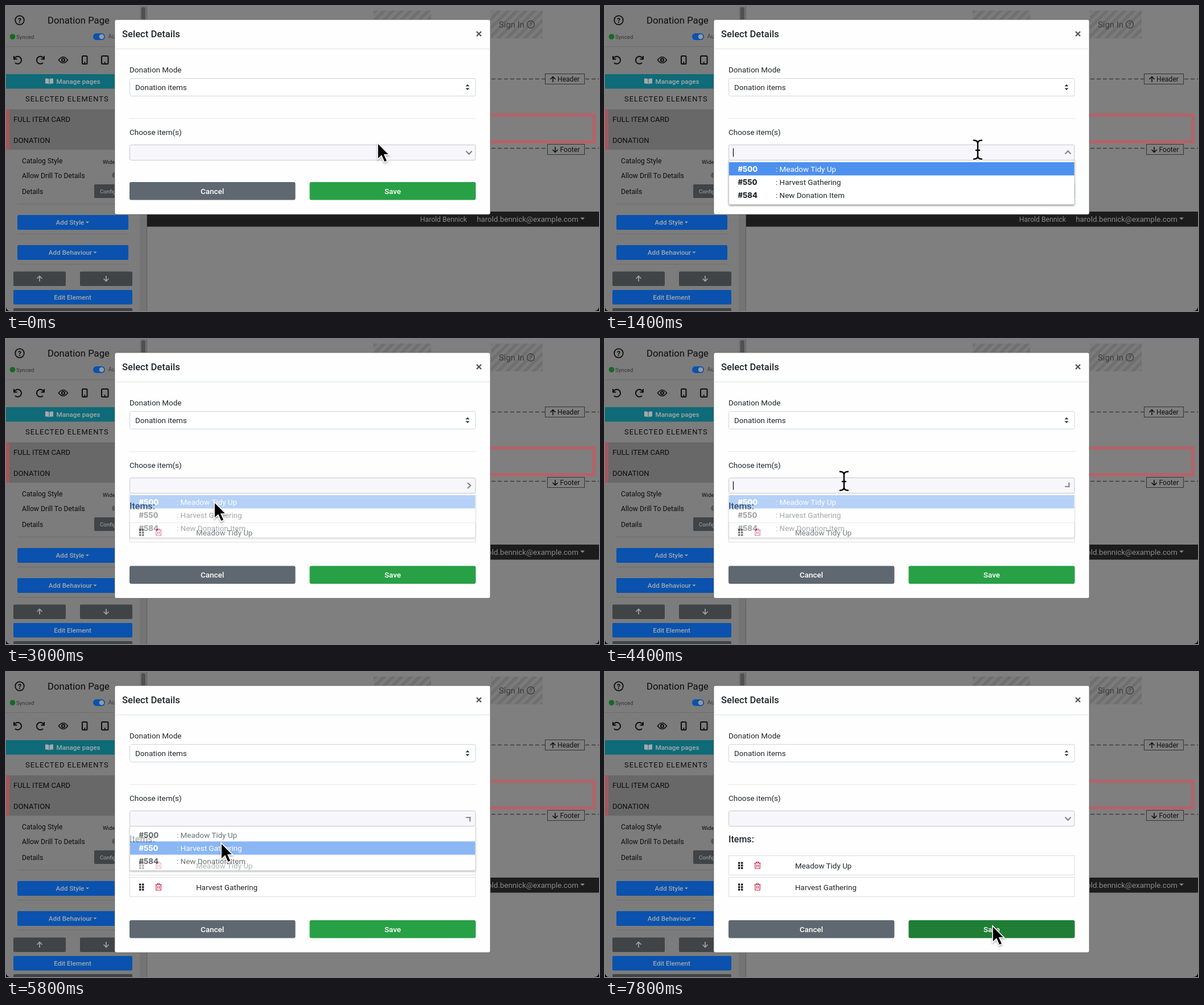
Animation of 1042 by 537 pixels, one loop 8000 ms. Source, as an HTML page:

```html
<!DOCTYPE html>
<html lang="en">
<head>
<meta charset="utf-8">
<title>Select Details</title>
<style>
  html, body { margin: 0; width: 100%; height: 100%; overflow: hidden; background: #000; }
  svg { display: block; width: 1042px; height: 537px; }
  text { font-family: Roboto, sans-serif; font-size: 13.45px; fill: #212529; white-space: pre; }
  .side text { font-size: 12.2px; fill: #0c0d0e; }
  .side .section { font-size: 13.1px; }
  .side .tiny { font-size: 9.7px; }
  .side .light { font-size: 11.7px; font-weight: 500; fill: #a5a9ad; text-anchor: middle; }
  .page text { font-size: 12.1px; fill: #111; }
  .page .user { font-size: 12.2px; fill: #8b8b8b; text-anchor: end; }
  .icon { fill: none; stroke: #0c0d0e; stroke-width: 2; }
  .pale { fill: none; stroke: #a0a4a8; stroke-width: 1.7; }
  .rule { stroke: #6b6c6d; }
  .blue { fill: #0a52ad; }
  .dark { fill: #404447; }
  .dash { stroke: #3c3c3c; stroke-width: 1.3; stroke-dasharray: 7 4; }
  .tag { fill: #7f7f7f; stroke: #333; }
  .title { font-size: 16.6px; font-weight: 500; }
  .button { font-weight: 500; fill: #fff; text-anchor: middle; }
  .code { font-family: Inter, sans-serif; font-size: 13px; font-weight: 800; }
  .on text { fill: #fff; }
  .field { fill: #fff; stroke: #ced4da; }
</style>
</head>
<body>
<svg viewBox="0 0 1042 537">
  <defs>
    <clipPath id="window"><path d="M0 0H1042V528Q1042 537 1033 537H9Q0 537 0 528Z"/></clipPath>
    <pattern id="hatch" width="11" height="11" patternUnits="userSpaceOnUse" patternTransform="rotate(45)">
      <rect width="11" height="11" fill="#7b7b7b"/><rect width="5.5" height="11" fill="#6f6f6f"/>
    </pattern>
    <filter id="shadow" x="-40%" y="-40%" width="200%" height="200%">
      <feDropShadow dx="0" dy="2" stdDeviation="1.8" flood-opacity=".35"/>
    </filter>
    <g id="handle">
      <g fill="#222">
        <rect x="234" width="3.4" height="3.4" y="-6"/><rect x="239" width="3.4" height="3.4" y="-6"/>
        <rect x="234" width="3.4" height="3.4" y="-1.5"/><rect x="239" width="3.4" height="3.4" y="-1.5"/>
        <rect x="234" width="3.4" height="3.4" y="3"/><rect x="239" width="3.4" height="3.4" y="3"/>
      </g>
      <path d="M262.5-4H273.5M266-4V-6H270V-4M263.8-4V5.5H272.2V-4M266.6-1.500V3M269.4-1.500V3" fill="none" stroke="#c51f3f" stroke-width="1.2"/>
    </g>
    <path id="up" d="M0 5V-4.500M-4.500 0L0-4.500L4.500 0"/>
    <path id="caretDown" d="M-3-1.500H3L0 1.500Z"/>
  </defs>

  <g clip-path="url(#window)">
    <rect width="1042" height="537" fill="#7f7f7f"/>

    <g class="page">
      <rect x="646" y="8" width="101" height="40" fill="url(#hatch)"/>
      <rect x="852" y="8" width="91" height="49" fill="url(#hatch)"/>
      <text x="866" y="38" style="font-size:14.9px;fill:#3d3d3d">Sign In</text>
      <circle cx="922" cy="32.500" r="6.500" fill="none" stroke="#3d3d3d" stroke-width="1.4"/>
      <text x="922" y="36.500" text-anchor="middle" style="font-size:11px;fill:#3d3d3d">?</text>
      <path class="dash" d="M248 128.500H1042M248 250.500H1042"/>
      <rect x="254" y="192" width="779" height="47" fill="#7f7f7f" stroke="#b0646a" stroke-width="6"/>
      <rect class="tag" x="947.500" y="119.500" width="69" height="18"/>
      <use href="#up" x="961" y="129" class="icon" style="stroke-width:1.5"/>
      <text x="969" y="133">Header</text>
      <rect class="tag" x="951.500" y="243.500" width="65" height="18"/>
      <use href="#up" transform="translate(965 253) scale(1 -1)" class="icon" style="stroke-width:1.5"/>
      <text x="973.500" y="257">Footer</text>
      <rect x="248" y="362" width="794" height="26.500" fill="#1c1c1c"/>
      <text class="user" x="810" y="380">Harold Bennick</text>
      <text class="user" x="1006" y="380" style="font-size:13.3px">harold.bennick@example.com</text>
      <use href="#caretDown" transform="translate(1013 374.500) scale(1.3)" fill="#8b8b8b"/>
    </g>

    <g class="side">
      <rect width="236" height="537" fill="#7c7c7d"/>
      <rect x="235" width="13" height="537" fill="#747475"/>
      <rect x="237.500" y="2" width="7.500" height="300" rx="3.700" fill="#505050"/>
      <path d="M247.500 0V537" stroke="#5e5e5e"/>
      <path class="rule" d="M0 71.500H235"/>
      <circle class="icon" cx="24" cy="25" r="7.800" style="stroke-width:1.8"/>
      <text x="24" y="29.500" text-anchor="middle" font-weight="700">?</text>
      <text x="73" y="31" style="font-size:16.7px">Donation Page</text>
      <circle cx="11.500" cy="54" r="4.800" fill="#136b20"/>
      <text class="tiny" x="18" y="57.500" style="fill:#333">Synced</text>
      <rect class="blue" x="153" y="48" width="21" height="12" rx="6"/>
      <circle cx="168" cy="54" r="4.300" fill="#96999d"/>
      <text x="179.500" y="57" style="font-size:10.5px;fill:#3c3c3c">Auto</text>

      <g class="icon">
        <path id="undo" d="M14 88V93.500H19.500M14.500 93A6.500 6.500 0 1 1 16 100"/>
        <use href="#undo" transform="translate(81 0) scale(-1 1)"/>
        <path d="M92.500 95Q100.500 84.500 108.500 95Q100.500 105.500 92.500 95Z" style="stroke-width:1.6"/>
        <circle cx="100.500" cy="95" r="2.600"/>
        <rect x="134" y="88" width="8.500" height="14" rx="1.500"/>
        <rect x="168" y="88" width="11.500" height="14" rx="1.500"/>
        <path d="M137 99.500H139.500M172.500 99.500H175"/>
      </g>

      <rect y="120" width="235" height="25.500" fill="#0f6b78"/>
      <path d="M69 127.500Q73 127 75.500 128.500V137.500Q73 136 69 136.500ZM83 127.500Q79 127 76.500 128.500V137.500Q79 136 83 136.500Z" fill="#a5a9ad"/>
      <text class="light" x="127" y="136.500">Manage pages</text>
      <text x="34" y="167.500" style="font-size:13px;letter-spacing:1px">SELECTED ELEMENTS</text>
      <rect y="182" width="235" height="71" fill="#686869"/>
      <rect y="182" width="6" height="71" fill="#a3575d"/>
      <text class="section" x="13" y="204">FULL ITEM CARD</text>
      <text class="section" x="13" y="240.500">DONATION</text>
      <text x="28" y="277">Catalog Style</text>
      <text class="tiny" x="170" y="277.500">Wide</text>
      <text x="28" y="302.500">Allow Drill To Details</text>
      <circle cx="191" cy="298" r="5" fill="#555"/>
      <text x="28" y="330.500">Details</text>
      <rect class="dark" x="155" y="314" width="60" height="24" rx="2"/>
      <text class="tiny" x="165" y="329.500" style="fill:#a5a9ad">Configure</text>
      <path class="rule" d="M20 348.500H215M20 401.500H215M20 454.500H215"/>
      <rect class="blue" x="20" y="368" width="195" height="26" rx="2"/>
      <text class="light" x="112.500" y="385">Add Style</text>
      <use href="#caretDown" x="143" y="381" fill="#a5a9ad"/>
      <rect class="blue" x="20" y="421" width="195" height="26" rx="2"/>
      <text class="light" x="113" y="438">Add Behaviour</text>
      <use href="#caretDown" x="156.500" y="434" fill="#a5a9ad"/>
      <rect class="dark" x="13" y="467.500" width="92" height="25.500" rx="2"/>
      <rect class="dark" x="130" y="467.500" width="92" height="25.500" rx="2"/>
      <use href="#up" x="59" y="480" class="pale"/>
      <use href="#up" transform="translate(176 480) scale(1 -1)" class="pale"/>
      <rect class="blue" x="13" y="500" width="209" height="25.500" rx="2"/>
      <text class="light" x="117" y="516.500">Edit Element</text>
      <rect class="dark" x="13" y="532" width="209" height="20" rx="2"/>
    </g>

    <rect id="modal" x="191" y="24" width="660" height="343" rx="3" fill="#fefefe" stroke="#5c5c5c" stroke-width=".7"/>
    <path d="M191 75.500H851" stroke="#dee2e6"/>
    <text class="title" x="204" y="55">Select Details</text>
    <path d="M827 45L835 53M835 45L827 53" stroke="#555" stroke-width="2.400"/>
    <text x="217" y="116.500">Donation Mode</text>
    <rect class="field" x="217.500" y="127.500" width="607.500" height="31" rx="3"/>
    <text x="227" y="148">Donation items</text>
    <path d="M807.500 141.500L811 137.700L814.500 141.500ZM807.500 144.500L811 148.300L814.500 144.500Z" fill="#343a40"/>
    <path d="M217 198H827" stroke="#e3e4e6"/>
    <text x="217" y="226.500">Choose item(s)</text>
    <rect x="217.500" y="244.500" width="607.500" height="27" rx="3" fill="#f7f7fb" stroke="#c4c7cd"/>
    <path id="chevron" d="M-5-2.500L0 2.800L5-2.500" fill="none" stroke="#858585" stroke-width="2.200"/>
    <path id="caret" d="M225.500 250.500V265.500" stroke="#111" stroke-width="1.300"/>

    <g id="items">
      <text class="title" x="217" y="300" style="font-size:16px">Items:</text>
      <g class="item">
        <rect class="field" x="217.500" y="323.500" width="607.500" height="34" style="stroke:#dadcde"/>
        <use href="#handle" y="340.500"/>
        <text x="334" y="345.500">Meadow Tidy Up</text>
      </g>
      <g class="item">
        <rect class="field" x="217.500" y="361.500" width="607.500" height="34" style="stroke:#dadcde"/>
        <use href="#handle" y="378.500"/>
        <text x="334" y="383.500">Harvest Gathering</text>
      </g>
    </g>

    <g id="buttons">
      <rect x="217" y="310" width="291.500" height="31.500" rx="3" fill="#5f6870"/>
      <text class="button" x="362.500" y="330.500">Cancel</text>
      <rect id="save" x="533.500" y="310" width="292" height="31.500" rx="3"/>
      <text class="button" x="679.500" y="330.500">Save</text>
    </g>

    <g id="menu">
      <path d="M217.500 271.500V346.500Q217.500 349.500 220.500 349.500H822Q825 349.500 825 346.500V271.500Z" fill="#fff" stroke="#c4c7cd" filter="url(#shadow)"/>
      <rect id="highlight" x="218" y="275" width="606.500" height="23.300" fill="#4d90ee"/>
      <g class="option"><text class="code" x="233.500" y="291.500">#500</text><text x="300" y="291.500">: Meadow Tidy Up</text></g>
      <g class="option"><text class="code" x="233.500" y="315">#550</text><text x="300" y="315">: Harvest Gathering</text></g>
      <g class="option"><text class="code" x="233.500" y="338">#584</text><text x="300" y="338">: New Donation Item</text></g>
    </g>

    <path id="arrow" d="M0 0V29L6.700 22.700L11.800 34L17 31.700L12 20.800H20.500Z" fill="#000" stroke="#fff" stroke-width="1.600" filter="url(#shadow)"/>
    <g id="beam" fill="none" stroke-linecap="round">
      <path id="beamLine" d="M-7-16.500Q0-16.500 0-11Q0-16.500 7-16.500M0-11V11M-7 16.500Q0 16.500 0 11Q0 16.500 7 16.500M-3 1H3" stroke="#fff" stroke-width="4.500"/>
      <use href="#beamLine" style="stroke:#000"/>
      <path d="M-7-16.500Q0-16.500 0-11Q0-16.500 7-16.500M0-11V11M-7 16.500Q0 16.500 0 11Q0 16.500 7 16.500M-3 1H3" stroke="#000" stroke-width="2.500"/>
    </g>
  </g>
</svg>
<script>
  const LOOP = 8000, STEP = 200;
  const $ = id => document.getElementById(id);
  const items = document.querySelectorAll('.item');
  const options = document.querySelectorAll('.option');

  // time, x, y of the pointer
  const pointer = [
    [0, 653, 241], [400, 653, 241], [1000, 655, 253], [1800, 655, 253],
    [2600, 366, 287], [3400, 366, 287], [4000, 420, 250], [4600, 420, 250],
    [5000, 378, 294], [5400, 378, 294], [5600, 378, 301], [6200, 378, 301],
    [7400, 681, 447], [LOOP, 681, 447]
  ];
  // time, menu opacity, chevron angle
  const menuStates = [
    [0, 0, 0], [1200, 1, -180], [3000, .4, -90], [3200, 0, 0],
    [4400, .4, -45], [4600, 1, -180], [5800, .65, -135], [6000, 0, 0]
  ];

  const show = (node, on) => node.style.display = on ? '' : 'none';
  const move = (id, x, y) => $(id).setAttribute('transform', `translate(${x} ${y})`);

  function pointerAt(t) {
    const i = pointer.findIndex(k => k[0] > t);
    const [t0, x0, y0] = pointer[i - 1], [t1, x1, y1] = pointer[i];
    const u = (t - t0) / (t1 - t0), s = u * u * (3 - 2 * u);
    return [x0 + (x1 - x0) * s, y0 + (y1 - y0) * s];
  }

  function draw(t) {
    const [x, y] = pointerAt(t);
    const [since, opacity, angle] = menuStates.filter(k => k[0] <= t).pop();
    const count = t >= 5800 ? 2 : t >= 3000 ? 1 : 0;
    const grow = [0, 89.5, 127][count];
    const typing = y >= 244 && y < 272;
    const current = y >= 298 && y < 322 ? 1 : 0;

    $('modal').setAttribute('height', 343 + grow);
    move('buttons', 0, grow);
    show($('items'), count > 0);
    items.forEach((item, i) => show(item, i < count));

    $('menu').style.opacity = opacity;
    $('highlight').setAttribute('y', 275 + current * 23.3);
    options.forEach((option, i) => option.classList.toggle('on', i === current));
    $('chevron').setAttribute('transform', `translate(813.5 258) rotate(${angle})`);
    const opening = opacity === 1 || since === 4400;
    show($('caret'), opening && (t + 600) % 1000 < 500);

    const overSave = x > 533 && x < 826 && y > 310 + grow && y < 341 + grow;
    $('save').setAttribute('fill', overSave ? '#1f7d36' : '#28a046');

    show($('arrow'), !typing);
    show($('beam'), typing);
    move(typing ? 'beam' : 'arrow', x, y);
  }

  const start = performance.now();
  function tick(now) {
    const t = Math.max(0, now - start) % LOOP;
    draw(Math.floor(t / STEP) * STEP);
    requestAnimationFrame(tick);
  }
  draw(0);
  requestAnimationFrame(tick);
</script>
</body>
</html>
```
